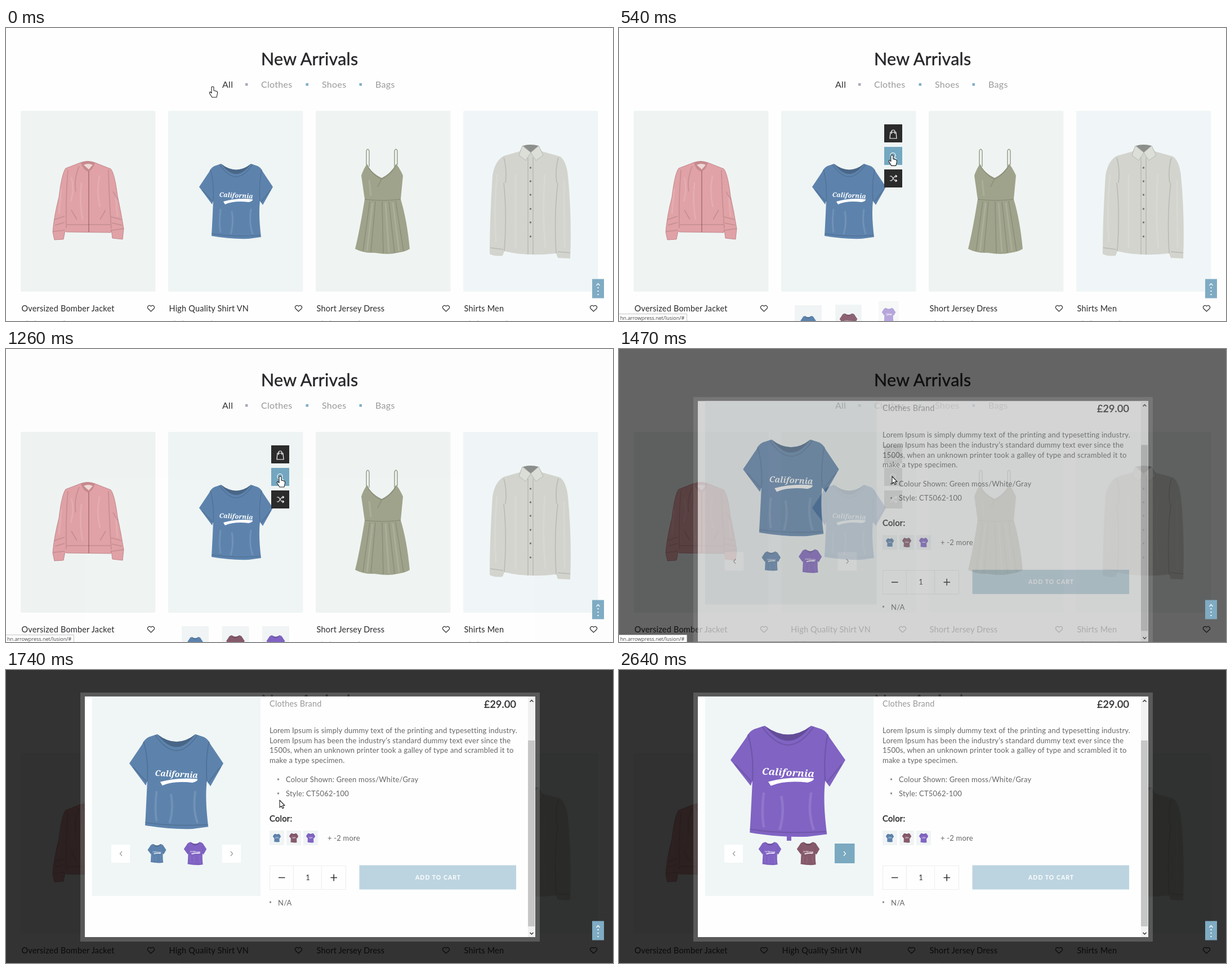
An HTML page for the animation above (2670 ms loop, 1078 px wide and 520 px high).

```html
<!DOCTYPE html>
<html lang="en">
<head>
<meta charset="utf-8">
<title>New Arrivals</title>
<style>
html, body { margin: 0; width: 100%; height: 100%; overflow: hidden; background: #fefefe; }
svg { display: block; width: 1078px; height: 520px; font: 13px Lato, "Open Sans", sans-serif; letter-spacing: .2px; }
.line { fill: none; stroke: #333; stroke-width: 1.2; }
.white { fill: none; stroke: #fff; stroke-width: 1.2; }
.fold { fill: none; stroke: #000; stroke-opacity: .13; stroke-width: 1.5; }
.shine { fill: none; stroke: #fff; stroke-opacity: .12; stroke-width: 3; }
.medium { stroke: currentColor; stroke-width: .4px; }
.label { font-size: 14.5px; fill: #2b2b2f; }
.nav { font-size: 16px; letter-spacing: .3px; fill: #9a9a9a; }
.gray { fill: #666; }
</style>
</head>
<body>
<svg viewBox="0 0 1078 520">
  <defs>
    <g id="tee">
      <path d="M39 0L27 4Q21 7 18 14L0 41L23 72L25 66C24 90 23 110 22 128Q55 134 88 133L110 130C107 105 106 85 108 66L113 73L131 41L113 14Q110 7 104 4L92 0Q66 21 39 0Z"/>
      <path d="M39 0Q66 21 92 0Q66 36 39 0Z" fill="#000" opacity=".22"/>
      <path class="fold" d="M36 1Q66 45 95 1M20 10Q27 35 25 66M111 10Q106 35 108 66M5 46L24 67M127 46L110 68M22 124Q60 130 109 127"/>
      <path class="shine" d="M38 80Q35 105 38 122M58 84Q62 105 56 125M92 80Q88 105 95 125"/>
      <text x="65.500" y="60" transform="rotate(3 65 60)" text-anchor="middle" fill="#fff" font-family="Noto Serif, serif" font-size="11.300" font-weight="700" font-style="italic" letter-spacing="0">California</text>
      <path d="M43 67Q68 60 95 63Q96 66 88 68Q62 65 46 72Z" fill="#fff"/>
    </g>
    <path id="heart" class="line" d="M0 5.500L-5.200 .5A3.300 3.300 0 0 1 0 -3.700A3.300 3.300 0 0 1 5.200 .5Z"/>
    <clipPath id="inner"><path d="M140 47H940V474H140Z"/></clipPath>
    <clipPath id="photo"><path d="M153 47H452V401H153Z"/></clipPath>
    <clipPath id="strip"><path d="M234 300H370V350H234Z"/></clipPath>
  </defs>

  <g id="page">
    <rect width="1078" height="520" fill="#fefefe"/>
    <text x="453" y="66" font-size="30.500" fill="#26262a" color="#26262a" class="medium">New Arrivals</text>
    <text x="384" y="106" class="nav" style="fill:#333">All</text>
    <text x="453" y="106" class="nav">Clothes</text>
    <text x="561" y="106" class="nav">Shoes</text>
    <text x="656" y="106" class="nav">Bags</text>
    <path d="M425 98h4.500v4.500h-4.500z" fill="#a4abb8"/>
    <path d="M532.500 98h4.500v4.500h-4.500zM627.500 98h4.500v4.500h-4.500z" fill="#7fadc8"/>
    <g id="cards"></g>

    <g id="jacket">
      <path fill="#e0a2a6" stroke="#b9787e" stroke-width=".8" d="M132 239L106 249Q99 258 94 300Q85 335 83 362L86 376L102 375L105 360L107 362L186 363L187 358L189 373L207 375L209 356Q204 325 198 298Q193 258 186 250L158 239Q145 234 132 239Z"/>
      <path fill="#c8898e" d="M133 239Q145 234 158 239Q154 252 146 255Q137 252 133 239Z"/>
      <path fill="#ecd8d4" d="M138 243Q146 239 154 243L147 251Z"/>
      <path class="line" style="stroke:#9d626b" d="M147 254V362"/>
      <path class="fold" d="M110 252Q106 300 107 355M182 252Q183 300 187 356M108 349H186M84 361L104 359M188 359L209 356M116 323L126 340M177 323L167 340M86 340L104 334M87 350L104 345M186 335L205 340M188 346L206 350M130 245Q120 270 124 290M190 290L198 304"/>
      <path class="shine" d="M116 265Q122 285 115 308M134 275Q130 310 136 340M166 262Q160 290 167 318M98 285L94 330M195 300L198 335"/>
    </g>

    <use id="blueTee" href="#tee" x="343" y="241"/>

    <g id="dress">
      <path fill="none" stroke="#a0a38e" stroke-width="1.600" d="M640 243V218Q642.500 212 645 218V246M690 246V218Q692.500 212 695 218V243"/>
      <path fill="#9fa38b" d="M641 241Q634 252 631 262L637 304Q628 360 620 392Q635 400 655 399Q680 403 695 399Q710 397 717 392Q712 340 701 304L705 262Q700 250 693 241Q684 258 667 266Q648 257 641 241Z"/>
      <path class="fold" d="M637 304Q668 308 701 304M641 243Q650 260 667 268Q684 260 693 243M667 268L660 282M646 308L634 396M656 308L648 398M668 308L670 400M680 308L690 399M692 307L706 396"/>
      <path class="shine" d="M651 310L641 396M674 310L680 398M687 310L698 396M645 270L648 298"/>
    </g>

    <g id="shirt">
      <path fill="#d3d4ce" d="M912 219L884 227Q868 236 864 262Q859 340 859 401Q868 406 882 404L885 396Q925 406 977 400L980 408L1002 409Q1005 335 998 262Q995 236 984 228L952 219L945 209Q930 205 918 209Z"/>
      <path fill="#8d8f8c" d="M918 209Q931 205 946 209L932 221Z"/>
      <path fill="#dcded8" stroke="#aeb1aa" stroke-width=".8" d="M917 209L911 226L923 235L932 221ZM946 209L954 226L941 235L932 221Z"/>
      <path class="fold" d="M927 230V402M936 230V402M885 396Q890 330 884 275M977 400Q973 330 980 275M860 390L883 393M980 397L1002 399M884 230Q890 250 887 275M981 230Q975 250 978 275"/>
      <path class="shine" d="M872 260Q866 320 870 380M905 260V390M957 260Q952 330 958 390M991 270L992 390"/>
      <g id="studs" fill="#777"></g>
    </g>

    <g id="swatches"></g>
    <g id="actions">
      <path fill="#2b2b2b" d="M471 171h32v32h-32zM471 211h32v32h-32zM471 251h32v32h-32z"/>
      <path id="lens" fill="#74a7c0" d="M471 211h32v32h-32z"/>
      <path class="white" d="M482 185H492L493 196H481ZM484 188V184Q484 181 487 181Q490 181 490 184V188M490 230L493 233M481 263H484L490 271H493M481 271H484L490 263H493M491 261L493.500 263L491 265M491 269L493.500 271L491 273"/>
      <circle class="white" cx="486.500" cy="226" r="4.500"/>
    </g>
  </g>

  <path id="shade" fill-rule="evenodd"/>
  <rect id="under" x="140" width="800" height="427"/>

  <g id="modal">
    <path d="M132 40H948V482H132ZM140 47V474H940V47Z" fill="#fff" fill-opacity=".19" fill-rule="evenodd"/>
    <g clip-path="url(#inner)">
      <rect x="140" y="47" width="800" height="427" fill="#fefefe"/>
      <g id="gallery">
        <rect x="153" y="47" width="299" height="354" fill="#f0f6f6"/>
        <g clip-path="url(#photo)"><g id="slides"></g></g>
        <g clip-path="url(#strip)"><g id="thumbs"></g></g>
        <rect x="187" y="310" width="33" height="32" fill="#fff"/>
        <rect id="next" x="384" y="310" width="33" height="32" fill="#fff"/>
        <path class="line" style="stroke:#999" d="M206 322L202.500 326L206 330"/>
        <path id="chevron" class="line" d="M399 322L402.500 326L399 330"/>
      </g>

      <text x="468" y="65" font-size="14.500" fill="#999">Clothes Brand</text>
      <text x="906" y="67" text-anchor="end" font-size="17.800" fill="#2b2b2f" color="#2b2b2f" class="medium">£29.00</text>
      <g class="gray">
        <text x="468" y="112">Lorem Ipsum is simply dummy text of the printing and typesetting industry.</text>
        <text x="468" y="129.700">Lorem Ipsum has been the industry’s standard dummy text ever since the</text>
        <text x="468" y="147.400">1500s, when an unknown printer took a galley of type and scrambled it to</text>
        <text x="468" y="165">make a type specimen.</text>
        <text x="497" y="198.500">Colour Shown: Green moss/White/Gray</text>
        <text x="497" y="223.500">Style: CT5062-100</text>
        <text x="571" y="302.500">+ -2 more</text>
        <text x="483" y="417.500">N/A</text>
        <path d="M482 192.500h3v3h-3zM482 217.500h3v3h-3zM468 410.500h3v3h-3z" fill="#8a8f96"/>
      </g>
      <text x="468" y="269" font-size="14.800" fill="#2b2b2f" color="#2b2b2f" class="medium">Color:</text>
      <g id="colors"></g>
      <path class="line" style="stroke:#eee" d="M468.500 347.500H603.500V389.500H468.500ZM510.500 347V389M560.500 347V389"/>
      <path class="line" style="stroke-width:1.600" d="M484 368.500H495.500M576.500 368.500H588M582.200 362.500V374.500"/>
      <text x="536" y="373" text-anchor="middle" fill="#333">1</text>
      <rect x="627.500" y="346.500" width="278.500" height="43" fill="#bcd4e0"/>
      <text x="727" y="372" font-size="10.500" font-weight="700" letter-spacing="1.050" fill="#fff">ADD TO CART</text>
      <rect x="927" y="47" width="13" height="427" fill="#f1f1f1"/>
      <rect x="927" y="125" width="12" height="330" fill="#c6c6c6"/>
      <path class="line" style="stroke-width:1.500" d="M930.500 56.500L933.500 53.500L936.500 56.500M930.500 466L933.500 469L936.500 466"/>
    </g>
  </g>

  <rect x="1041" y="445.500" width="21" height="34" fill="#7fabc3"/>
  <path class="white" d="M1048.500 457L1051.500 453.500L1054.500 457"/>
  <path d="M1050.500 460h2v2h-2zM1050.500 466h2v2h-2zM1050.500 472h2v2h-2z" fill="#fff"/>

  <g id="status">
    <path d="M-1 507.500H120.500V521H-1Z" fill="#fff" stroke="#c4c4c4"/>
    <text x="2" y="517.500" font-family="Open Sans, sans-serif" font-size="9" letter-spacing="0" fill="#444">hn.arrowpress.net/lusion/#</text>
  </g>
  <g id="cursor" fill="#fff" stroke="#222" stroke-width="1.100" stroke-linejoin="round">
    <path id="hand" d="M-2 1Q0 -1 2 1V7L7 8.300Q9 9 8.500 12L7 19H-1L-5.500 12Q-6 9 -4 9.500L-2 11.500Z"/>
    <path id="arrow" d="M0 0V13L3 10.300L5 14.800L7.200 13.800L5.200 9.500H9Z"/>
  </g>
</svg>

<script>
const LOOP = 2670;
const BLUE = '#5d83ad', MAROON = '#86596b', PURPLE = '#8063c3';
const $ = id => document.getElementById(id);
const set = (id, attrs) => { for (const k in attrs) $(id).setAttribute(k, attrs[k]); };
const show = (id, on) => set(id, { visibility: on ? 'visible' : 'hidden' });
const move = (x, y) => `translate(${x} ${y})`;
const ramp = (t, a, b) => Math.min(1, Math.max(0, (t - a) / (b - a)));
const ease = (t, a, b) => { const p = ramp(t, a, b); return p * p * (3 - 2 * p); };
const tee = (x, y, size, color) =>
  `<use href="#tee" transform="${move(x, y)} scale(${size})" fill="${color}"/>`;

const cards = [
  [26, 'Oversized Bomber Jacket', '#eff4f3'],
  [288, 'High Quality Shirt VN', '#eff5f4'],
  [550, 'Short Jersey Dress', '#eff4f3'],
  [812, 'Shirts Men', '#f0f6f7']
];
$('cards').innerHTML = cards.map(([x, name, color], i) => `
  <rect x="${x}" y="147" width="239.500" height="321" rx="2" fill="${color}"/>
  <g id="name${i}"><text x="${x + 1.5}" y="503" class="label">${name}</text>
  <text x="${x + 2}" y="528" font-size="12" fill="#aaa">Clothes Brand</text></g>
  <use id="like${i}" href="#heart" x="${x + 231.5}" y="497.500"/>`).join('');
set('blueTee', { fill: BLUE });

$('studs').innerHTML = [248, 272, 296, 321, 345, 370]
  .map(y => `<circle cx="931.500" cy="${y}" r="1.700"/>`).join('');

$('swatches').innerHTML = [[BLUE, .21], [MAROON, .25], [PURPLE, .25]].map(([color, size], i) =>
  `<g id="swatch${i}"><rect x="-24" y="-24" width="48" height="48" fill="#f0f4f5"/>${
    tee(-65.5 * size, i ? -8 : -5, size, color)}</g>`).join('');

$('colors').innerHTML = [[BLUE, .11], [MAROON, .125], [PURPLE, .125]].map(([color, size], i) => {
  const x = 468 + 30 * i;
  return `<rect x="${x}" y="285" width="26" height="26" fill="#f0f4f5"/>` +
    tee(x + 13 - 65.5 * size, 298 - 66 * size, size, color);
}).join('');

$('slides').innerHTML = tee(219, 114, '1.275 1.263', BLUE) + tee(498, 99, '1.557 1.48', PURPLE) +
  `<path d="M598 293h8v10h-8z" fill="${PURPLE}"/>`;

$('thumbs').innerHTML = [[BLUE, .252], [PURPLE, .308], [MAROON, .308]].map(([color, size], i) =>
  tee(268 + 68 * i - 65.5 * size, 325.5 - 66 * size, size, color)).join('');

// time, x, y of the pointer tip
const path = [
  [0, 367, 104], [330, 376, 194], [560, 487, 226], [1420, 487, 226], [1470, 485, 226],
  [1640, 486, 231], [1750, 486, 231], [1880, 401, 322], [LOOP, 401, 322]
];
function pointer(t) {
  const i = path.findIndex(p => p[0] > t);
  const [a, x, y] = path[i - 1], [b, u, v] = path[i], p = ease(t, a, b);
  return move(x + (u - x) * p, y + (v - y) * p);
}

function draw(t) {
  // hovered card
  const hover = ease(t, 120, 310) - ramp(t, 1380, 1560);
  const label = Math.min(1, 2 - 2 * hover);
  set('name1', { transform: move(32 * hover, 0), opacity: label });
  set('like1', { transform: move(-32 * hover, 0), opacity: label });
  [336, 407.5, 479].forEach((x, i) => {
    const s = ramp(t, 210 + 60 * i, 490 + 60 * i) - ramp(t, 1290, 1400);
    set('swatch' + i, { transform: `${move(x, 462 + 54 * s)} scale(${s})`, opacity: s * s });
  });
  set('actions', { opacity: ease(t, 350, 540) - ramp(t, 1380, 1560) });
  show('lens', t >= 540 && t < 1400);
  show('status', t >= 540 && t < 1560);

  // quick view opens; the page behind it darkens more slowly than around it
  const open = ramp(t, 1260, 1540), drop = 184 * (1 - open);
  set('shade', { opacity: .8 * open, d: `M0 0H1078V520H0ZM140 ${47 + drop}v427h800v-427Z` });
  set('under', { opacity: .8 * open ** 2, y: 47 + drop });
  set('modal', { opacity: open ** 1.6, transform: move(0, drop) });
  set('gallery', { transform: `${move(153, 47)} scale(${1.08 - .08 * open}) ${move(-153, -47)}` });

  // gallery steps on
  const step = ease(t, 1890, 2100), over = t >= 1860;
  set('slides', { transform: move(-300 * step, 0) });
  set('thumbs', { transform: move(-68 * step, 0) });
  set('next', over ? { x: 383, y: 308, width: 35.5, height: 35, fill: '#7aa9c0' }
                   : { x: 384, y: 310, width: 33, height: 32, fill: '#fff' });
  $('chevron').style.stroke = over ? '#fff' : '#999';

  const arrow = t >= 1350 && !over, seen = t < 2400;
  set('cursor', { transform: pointer(t) });
  show('hand', seen && !arrow);
  show('arrow', seen && arrow);
}

function frame() {
  draw(performance.now() % LOOP);
  requestAnimationFrame(frame);
}
frame();
</script>
</body>
</html>
```
